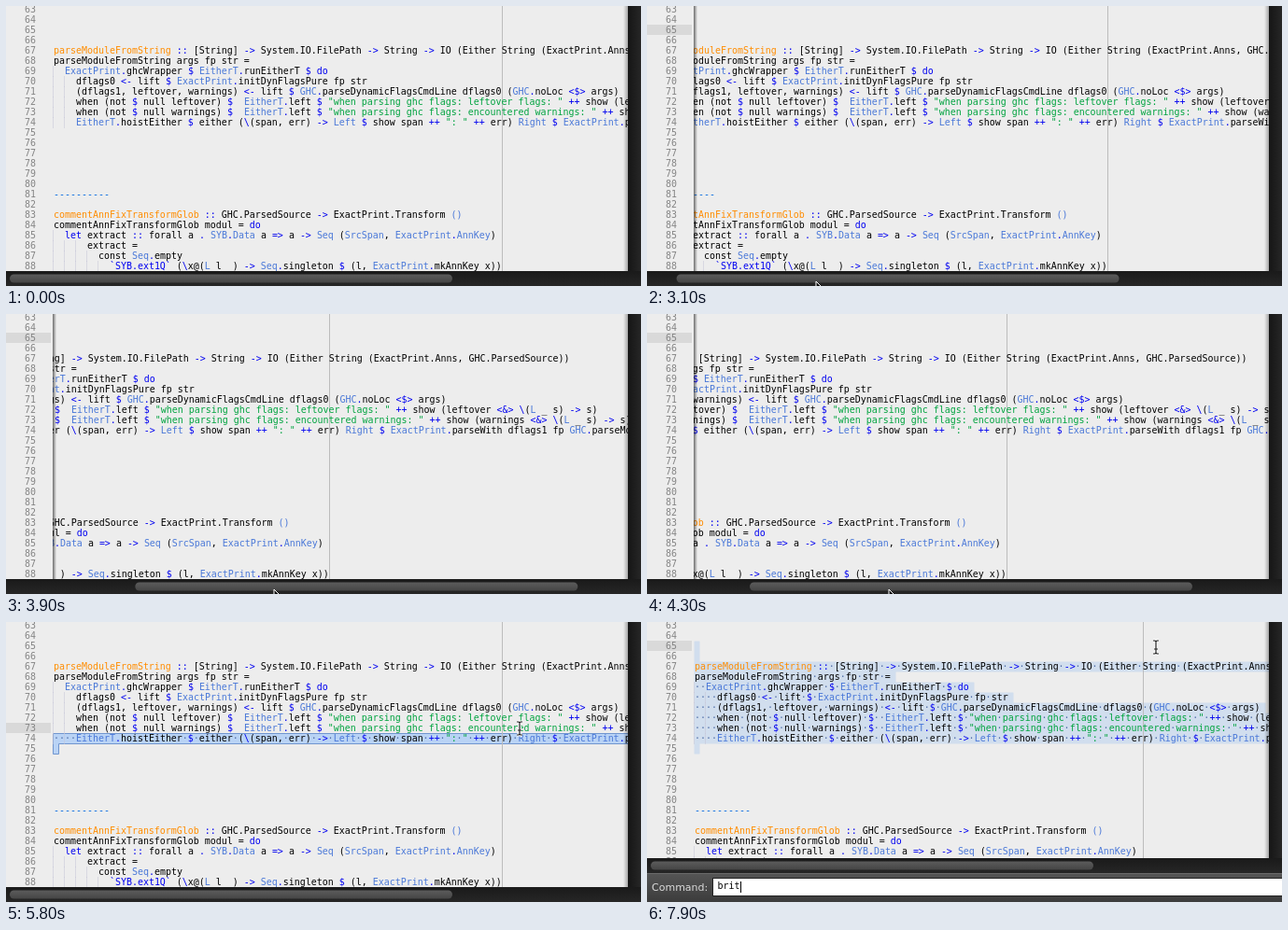
Animation of 680 by 300 pixels, one loop 8 s. Source, as an HTML page:

```html
<!DOCTYPE html>
<html lang="en">
<head>
<meta charset="utf-8">
<title>Editor</title>
<style>
html, body { margin: 0; width: 100%; height: 100%; overflow: hidden; background: #1c1c1c; }
svg { display: block; width: 680px; height: 300px; }
text { font: 9.966px "DejaVu Sans Mono", monospace; white-space: pre; fill: #000; }
.num { fill: #858585; }
.fn { fill: #ff8c00; }
.op { fill: #0000f0; }
.type { fill: #4a78d8; }
.str { fill: #00a33f; }
.note { fill: #0066e0; }
.dots { fill: #4f6ea8; }
.label { font: 11px "DejaVu Sans", sans-serif; fill: #dcdcdc; }
</style>
</head>
<body>
<svg id="stage" viewBox="0 0 680 300">
  <defs>
    <linearGradient id="side"><stop stop-color="#161616"/><stop offset="1" stop-color="#262626"/></linearGradient>
    <linearGradient id="track" x2="0" y2="1"><stop stop-color="#1a1a1a"/><stop offset="1" stop-color="#262626"/></linearGradient>
    <linearGradient id="knob" x2="0" y2="1"><stop stop-color="#5c5c5c"/><stop offset="1" stop-color="#454545"/></linearGradient>
    <linearGradient id="panel" x2="0" y2="1"><stop stop-color="#555"/><stop offset="1" stop-color="#3c3c3c"/></linearGradient>
    <linearGradient id="edge"><stop stop-opacity="0"/><stop offset="1" stop-opacity=".3"/></linearGradient>
    <linearGradient id="fold"><stop stop-opacity=".55"/><stop offset="1" stop-opacity="0"/></linearGradient>
    <clipPath id="view"><rect id="viewBox" width="666" height="284"/></clipPath>
    <clipPath id="page"><rect x="50" width="616" height="300"/></clipPath>
  </defs>
  <g clip-path="url(#view)">
    <rect width="666" height="300" fill="#ededed"/>
    <g clip-path="url(#page)">
      <g id="scroller">
        <path id="selection" stroke-linejoin="round"/>
        <path d="M531.5 0V300" stroke="#bcbcbc"/>
        <g id="guides" stroke="#c2c2d4" stroke-dasharray="1 1"></g>
        <g id="code"></g>
        <path id="caret" d="M50.5 21V32" stroke="#000"/>
      </g>
    </g>
    <rect width="50" height="300" fill="#ededed"/>
    <rect id="active" width="48" height="11" fill="#d9d9d9"/>
    <g id="numbers"></g>
    <rect id="foldShade" x="50" width="4" height="300" fill="url(#fold)"/>
    <rect x="661" width="5" height="300" fill="url(#edge)"/>
  </g>
  <rect x="666" width="14" height="300" fill="url(#side)"/>
  <g id="bar">
    <rect y="284" width="680" height="16" fill="url(#track)"/>
    <rect id="thumb" y="287.5" width="474" height="9" rx="4.5" fill="url(#knob)"/>
  </g>
  <g id="command">
    <rect y="269" width="680" height="31" fill="url(#panel)"/>
    <path d="M0 269.5H680" stroke="#6a6a6a"/>
    <rect x="70.5" y="274.5" width="620" height="19" fill="#fff" stroke="#222"/>
    <text class="label" x="5" y="288">Command:</text>
    <text id="typed" x="75.5" y="286"></text>
    <path id="inputCaret" d="M.5 278V290" stroke="#000"/>
  </g>
  <g id="beam" fill="none">
    <path d="M-3-7H-1L0-6L1-7H3M0-6V6M-3 7H-1L0 6L1 7H3M-2 2H2" stroke="#fff" stroke-width="3"/>
    <path d="M-3-7H-1L0-6L1-7H3M0-6V6M-3 7H-1L0 6L1 7H3M-2 2H2" stroke="#222" stroke-width="1.2"/>
  </g>
  <path id="arrow" d="M0 0V14L3.3 11L5.5 16L8 15L5.8 10H10Z" fill="#111" stroke="#fff"/>
</svg>
<script>
const $ = id => document.getElementById(id);
const LOOP = 8000, CHAR = 6, ROW = 11, LEFT = 50.5, TEXT_LEFT = 51, FIRST = 63;
const rowTop = n => 20.5 + ROW * (n - 65);

const source = {
  67: 'parseModuleFromString :: [String] -> System.IO.FilePath -> String -> IO (Either String (ExactPrint.Anns, GHC.ParsedSource))',
  68: 'parseModuleFromString args fp str =',
  69: '  ExactPrint.ghcWrapper $ EitherT.runEitherT $ do',
  70: '    dflags0 <- lift $ ExactPrint.initDynFlagsPure fp str',
  71: '    (dflags1, leftover, warnings) <- lift $ GHC.parseDynamicFlagsCmdLine dflags0 (GHC.noLoc <$> args)',
  72: '    when (not $ null leftover) $  EitherT.left $ "when parsing ghc flags: leftover flags: " ++ show (leftover <&> \\(L _ s) -> s)',
  73: '    when (not $ null warnings) $  EitherT.left $ "when parsing ghc flags: encountered warnings: " ++ show (warnings <&> \\(L _ s) -> s)',
  74: '    EitherT.hoistEither $ either (\\(span, err) -> Left $ show span ++ ": " ++ err) Right $ ExactPrint.parseWith dflags1 fp GHC.parseModule str',
  81: '----------',
  83: 'commentAnnFixTransformGlob :: GHC.ParsedSource -> ExactPrint.Transform ()',
  84: 'commentAnnFixTransformGlob modul = do',
  85: '  let extract :: forall a . SYB.Data a => a -> Seq (SrcSpan, ExactPrint.AnnKey)',
  86: '      extract =',
  87: '        const Seq.empty',
  88: '          `SYB.ext1Q` (\\x@(L l _) -> Seq.singleton $ (l, ExactPrint.mkAnnKey x))'
};

function add(parent, tag, attrs, content = '') {
  const node = document.createElementNS('http://www.w3.org/2000/svg', tag);
  for (const key in attrs) node.setAttribute(key, attrs[key]);
  node.textContent = content;
  return parent.appendChild(node);
}

function classify(token, signature, start) {
  if (/^---/.test(token)) return 'note';
  if (token[0] === '"') return 'str';
  if (token === '()') return 'type';
  if (token === '=') return '';
  if (signature) return start ? 'fn' : /^(::|->)$/.test(token) ? 'op' : '';
  if (/^[A-Z]/.test(token)) return 'type';
  return /^(do|let)$|^[`$+:\-.=<>&\\]/.test(token) ? 'op' : '';
}

const dotRows = {};
for (let n = FIRST; n <= 88; n++) {
  const y = rowTop(n) + 8.5;
  add($('numbers'), 'text', { class: 'num', x: 20, y }, n);
  const line = source[n];
  if (!line) continue;
  const indent = line.search(/\S/);
  for (let col = 0; col < indent; col += 2) {
    const x = LEFT + col * CHAR;
    add($('guides'), 'path', { d: `M${x} ${rowTop(n)}v${ROW}` });
  }
  const row = add($('code'), 'text', { x: TEXT_LEFT, y });
  const signature = /^\w+ ::/.test(line);
  const tokens = line.match(/"[^"]*"|`[^`]*`|\(\)|\w+|[$+:\-.=<>&\\]+|\s+|./g);
  tokens.forEach((token, i) => add(row, 'tspan', { class: classify(token, signature, i === 0) }, token));
  dotRows[n] = add($('code'), 'text', { class: 'dots', x: TEXT_LEFT, y },
    line.replace(/./g, c => c === ' ' ? '·' : ' '));
}

// Piecewise motion through [time, ...values] stops.
function along(stops, t) {
  let i = 1;
  while (i < stops.length - 1 && t > stops[i][0]) i++;
  const a = stops[i - 1], b = stops[i];
  const k = Math.min(1, Math.max(0, (t - a[0]) / (b[0] - a[0])));
  return a.slice(1).map((v, j) => v + (b[j + 1] - v) * k);
}

const scrollStops = [[2900, 0], [3300, 75], [3600, 153], [3800, 181], [3950, 187], [4100, 177], [4300, 146], [4500, 70], [4700, 0]];
const approach = [[1700, 136, -16], [1800, 134, -4], [2000, 126, 18], [2150, 122, 26], [2350, 124, 28], [2600, 150, 268], [2800, 153, 295]];
const retreat = [[4700, 153, 295], [4900, 215, 285], [5200, 450, 210], [5400, 590, 145], [5600, 560, 126], [5700, 552, 124],
  [5800, 550, 114], [6200, 547, 72], [6600, 545, 27]];

function pointer(t, scroll) {
  if (t < 2800) return along(approach, t);
  return t < 4700 ? [153 + scroll * .726, 295] : along(retreat, t);
}

const lineAt = t => Math.max(65, Math.min(74, 65 + Math.floor((pointer(t, 0)[1] - 20.5) / ROW)));

function selectionPath(from) {
  let d = `M${LEFT} ${rowTop(from)}`;
  for (let n = from; n <= 75; n++) {
    const right = LEFT + ((source[n] || '').length + 1) * CHAR;
    d += `H${right}V${rowTop(n + 1)}`;
  }
  return d + `H${LEFT}Z`;
}

const show = (node, on) => node.setAttribute('visibility', on ? 'visible' : 'hidden');
const move = (id, x, y) => $(id).setAttribute('transform', `translate(${x} ${y})`);

function draw(t) {
  const scroll = Math.round(along(scrollStops, t)[0]);
  const [x, y] = pointer(t, scroll).map(Math.round);
  const panel = t >= 7200, selecting = t >= 5700;

  move('scroller', -scroll, 0);
  show($('foldShade'), scroll > 0);
  $('thumb').setAttribute('x', 4 + scroll * .726);
  move('bar', 0, panel ? -31 : 0);
  $('viewBox').setAttribute('height', panel ? 253 : 284);

  const current = selecting ? lineAt(t) : 65;
  show($('active'), t >= 2200);
  $('active').setAttribute('y', rowTop(current) - .5);
  show($('caret'), t >= 2200 && !selecting && Math.floor((t - 2200) / 500) % 2 === 0);

  // The painted selection trails the pointer slightly.
  const from = t < 5800 ? 74 : lineAt(t - 100);
  const selection = $('selection');
  show(selection, selecting);
  selection.setAttribute('d', selectionPath(from));
  selection.setAttribute('fill', panel ? '#d1deee' : '#b9d3f5');
  selection.setAttribute('stroke', panel ? 'none' : '#7196cf');
  for (const n in dotRows) show(dotRows[n], selecting && n >= from && n <= 74);

  const typed = 'brit'.slice(0, [7500, 7600, 7700, 7900].filter(at => t >= at).length);
  show($('command'), panel);
  $('typed').textContent = typed;
  move('inputCaret', 76 + typed.length * CHAR, 0);

  const onBar = y > 284;
  show($('beam'), t >= 1800 && !onBar);
  show($('arrow'), onBar);
  move('beam', x, y);
  move('arrow', x, y);
}

const begin = performance.now();
function tick() {
  draw((performance.now() - begin) % LOOP);
  requestAnimationFrame(tick);
}
tick();
</script>
</body>
</html>
```
